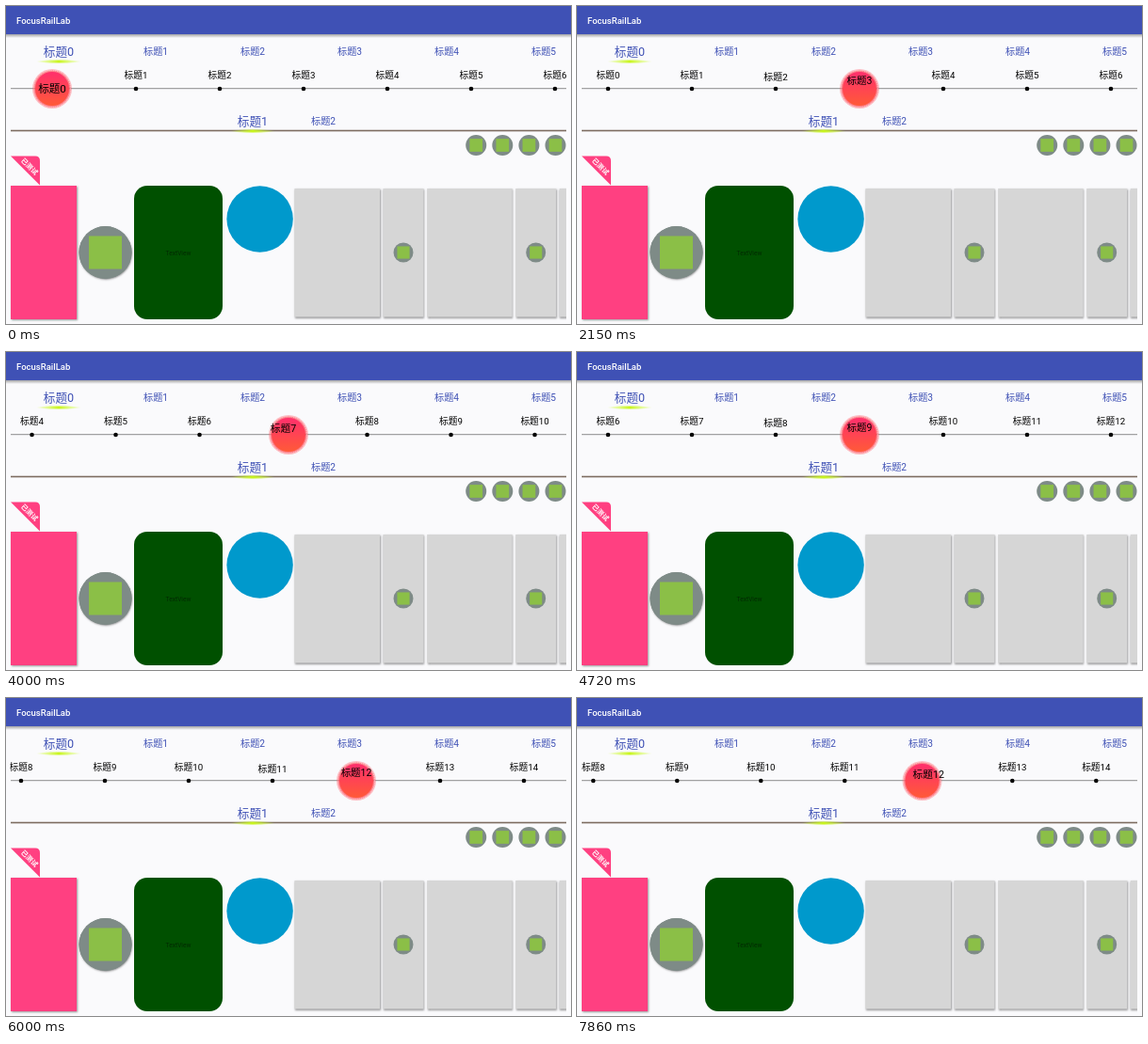
An HTML page with a canvas that plays this animation: 600x338 px, repeating every 8 s.

```html
<!DOCTYPE html>
<html lang="zh">
<head>
<meta charset="utf-8">
<style>
html, body { margin: 0; width: 100%; height: 100%; overflow: hidden; background: #fafafc; }
canvas { display: block; width: 600px; height: 338px; }
</style>
</head>
<body>
<canvas id="stage"></canvas>
<script>
const W = 600, H = 338, LOOP = 8000;
const FONT = 'Roboto, "Noto Sans CJK SC", "Noto Sans CJK", sans-serif';
const INDIGO = '#3f51b5', PINK = '#ff4081', GREEN = '#8bbf47', CARD = '#d6d6d6';
const canvas = document.getElementById('stage');
const ctx = canvas.getContext('2d');
const ratio = window.devicePixelRatio || 1;
canvas.width = W * ratio;
canvas.height = H * ratio;

const clamp = (v, lo, hi) => Math.min(hi, Math.max(lo, v));
const mix = (a, b, u) => a + (b - a) * u;

function rect(x, y, w, h, fill) {
  ctx.fillStyle = fill;
  ctx.fillRect(x, y, w, h);
}

function disc(x, y, r, fill) {
  ctx.fillStyle = fill;
  ctx.beginPath();
  ctx.arc(x, y, r, 0, Math.PI * 2);
  ctx.fill();
}

// y is the vertical middle of the glyphs
function text(str, x, y, size, color, align = 'center', weight = 400) {
  ctx.font = `${weight} ${size}px ${FONT}`;
  ctx.textAlign = align;
  ctx.fillStyle = color;
  ctx.fillText(str, x, y + size * 0.37);
}

function shadowed(draw, blur = 2, dx = 0.5, dy = 1) {
  ctx.save();
  ctx.shadowColor = 'rgba(0,0,0,.4)';
  ctx.shadowBlur = blur * ratio;
  ctx.shadowOffsetX = dx * ratio;
  ctx.shadowOffsetY = dy * ratio;
  draw();
  ctx.restore();
}

function vertical(y0, y1, ...colors) {
  const g = ctx.createLinearGradient(0, y0, 0, y1);
  colors.forEach((c, i) => g.addColorStop(i / (colors.length - 1), c));
  return g;
}

function glow(x, y) {
  const g = ctx.createLinearGradient(x - 24, 0, x + 24, 0);
  g.addColorStop(0, 'rgba(205,255,40,0)');
  g.addColorStop(0.5, '#c8f51c');
  g.addColorStop(1, 'rgba(205,255,40,0)');
  ctx.fillStyle = g;
  ctx.beginPath();
  ctx.ellipse(x, y, 24, 1.5, 0, 0, Math.PI * 2);
  ctx.fill();
}

function icon(x, y, r) {
  disc(x, y, r, '#7e8b87');
  const s = r * 1.25;
  rect(x - s / 2, y - s / 2, s, s, GREEN);
}

function header() {
  rect(0, 30, W, 4, vertical(30, 34, 'rgba(0,0,0,.35)', 'rgba(0,0,0,0)'));
  rect(0, 0, W, 30, INDIGO);
  text('FocusRailLab', 11, 15.5, 9.5, '#fff', 'left', 500);
}

function tabs() {
  for (let i = 0; i < 6; i++) text('标题' + i, 56 + 103 * i, 48, i ? 10.2 : 12.6, INDIGO);
  glow(56, 59);
  rect(5, 131.7, 590, 1.6, '#7c6c60');
  text('标题1', 262, 122, 12.6, INDIGO);
  text('标题2', 337, 122, 10.2, INDIGO);
  glow(262, 133);
}

function ribbon() {
  ctx.fillStyle = PINK;
  ctx.beginPath();
  ctx.moveTo(5, 159.5);
  ctx.lineTo(31, 159.5);
  ctx.quadraticCurveTo(36, 159.5, 36, 164.5);
  ctx.lineTo(36, 190.5);
  ctx.fill();
  ctx.save();
  ctx.translate(25, 170.5);
  ctx.rotate(Math.PI / 4);
  text('已测试', 0, 0, 7.2, '#fff', 'center', 700);
  ctx.restore();
}

function widgets() {
  for (let i = 0; i < 4; i++) icon(499.2 + 28.1 * i, 148, 11);
  ribbon();
  shadowed(() => rect(5, 191, 70, 142, PINK));
  shadowed(() => disc(105.5, 262, 28, '#7e8b87'));
  icon(105.5, 262, 28);
  ctx.fillStyle = '#005000';
  ctx.beginPath();
  ctx.roundRect(136, 191, 94, 142, 14);
  ctx.fill();
  text('TextView', 183, 262.5, 6.6, '#002a00');
  disc(269.6, 226.5, 35.2, '#0099cc');
  ctx.save();
  ctx.beginPath();
  ctx.rect(300, 185, 295, 153);
  ctx.clip();
  for (let x = 306.5; x < 595; x += 140.7) {
    shadowed(() => rect(x, 194, 90.5, 136.5, CARD));
    shadowed(() => rect(x + 94, 194, 43, 136.5, CARD));
    icon(x + 115.5, 262, 10.5);
  }
  ctx.restore();
}

// Timeline: the focus steps to the last item and then turns back
const GAP = 89, FIRST = 49, LAST = 14, STEPS = 17, PERIOD = 428, MOVE = 340;
const itemAt = step => LAST - Math.abs(LAST - step);
const stepStart = step => step === 1 ? 840 : 952 + PERIOD * (step - 1);
const scrollFor = item => clamp(W / 2 - FIRST - GAP * item, -745, 0);
const homeX = item => FIRST + GAP * item + scrollFor(item);

function marker(x) {
  const y = 88;
  disc(x, y, 21, 'rgba(255,80,95,.35)');
  disc(x, y, 19.7, 'rgba(255,75,90,.55)');
  disc(x, y, 18, vertical(y - 18, y + 18, '#ff2f6c', '#ff5a38'));
  ctx.strokeStyle = 'rgba(255,255,255,.55)';
  ctx.lineWidth = 0.8;
  ctx.setLineDash([1, 1]);
  ctx.beginPath();
  ctx.arc(x, y, 19.4, 0, Math.PI * 2);
  ctx.stroke();
  ctx.setLineDash([]);
}

function timeline(t) {
  let step = 0;
  while (step < STEPS && t >= stepStart(step + 1)) step++;
  const from = itemAt(Math.max(step - 1, 0)), to = itemAt(step);
  const age = step ? t - stepStart(step) : 0;
  const move = clamp(age / MOVE, 0, 1) ** 1.5;
  const fade = clamp(age / PERIOD, 0, 1);
  const scroll = mix(scrollFor(from), scrollFor(to), move);

  // How far a label has dropped into the marker
  const lift = item => {
    if (!step) return item === 0 ? 1 : 0;
    if (item === to) return 0.65 * fade ** 2;
    if (item === from) return (step === 1 ? 1 : 0.62) * (1 - fade);
    return 0;
  };

  ctx.save();
  ctx.beginPath();
  ctx.rect(4.5, 62, 591, 50);
  ctx.clip();
  rect(5, 87.2, 590, 1, '#8c8c8c');
  for (let i = 0; i <= LAST; i++) disc(FIRST + GAP * i + scroll, 88, 2.3, '#000');
  marker(mix(homeX(from), homeX(to), move));
  for (let i = 0; i <= LAST; i++) {
    const h = lift(i);
    text('标题' + i, FIRST + GAP * i + scroll, 73.5 + 14.5 * h, 9.7 + 1.9 * h, '#000');
  }
  ctx.restore();
}

function frame(now) {
  ctx.setTransform(ratio, 0, 0, ratio, 0, 0);
  rect(0, 0, W, H, '#fafafc');
  header();
  tabs();
  timeline(now % LOOP);
  widgets();
  requestAnimationFrame(frame);
}
requestAnimationFrame(frame);
</script>
</body>
</html>
```
